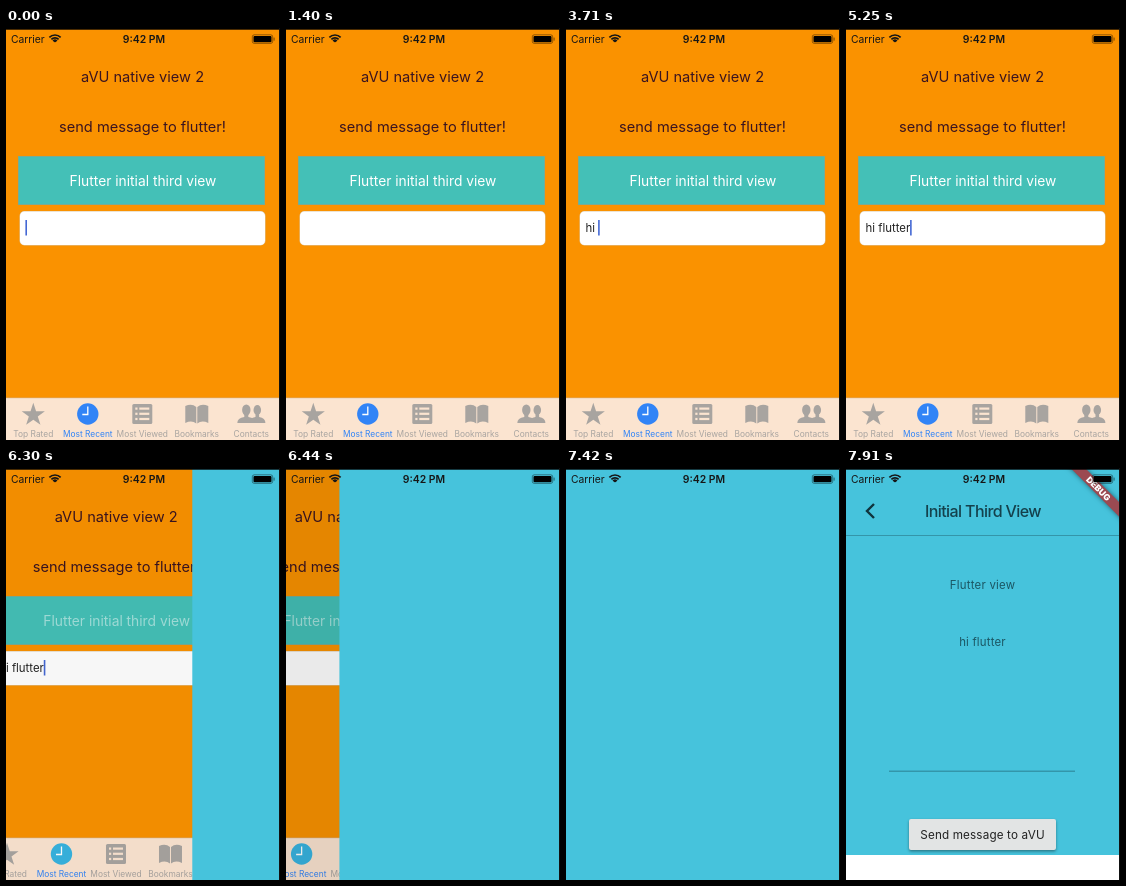
Animation of 274x412 px, one loop 8 s. Source, as an HTML page with a canvas:

```html
<!DOCTYPE html>
<html lang="en">
<head>
<meta charset="utf-8">
<title>Message demo</title>
<style>
html, body { margin: 0; width: 100%; height: 100%; overflow: hidden; background: #000; }
canvas { display: block; width: 274px; height: 412px; }
</style>
</head>
<body>
<canvas id="stage"></canvas>
<script>
const W = 274, H = 412, LOOP = 8000;
const ORANGE = '#fa9200', CYAN = '#46c3dc', GRAY = '#a8a4a0', BLUE = '#3284f6';
const MESSAGE = 'hi flutter';
const KEY_TIMES = [2870, 3080, 3360, 3920, 4060, 4200, 4340, 4480, 4760, 5250];
const PUSH = 6215, LOADED = 7460;

const canvas = document.getElementById('stage');
const ctx = canvas.getContext('2d');
const dpr = window.devicePixelRatio || 1;
canvas.width = W * dpr;
canvas.height = H * dpr;

const clamp = v => Math.max(0, Math.min(1, v));
const ramp = (t, a, b) => clamp((t - a) / (b - a));

function text(str, x, y, size, color, { weight = 400, align = 'center', track = 0 } = {}) {
  ctx.font = `${weight} ${size}px Inter, "Liberation Sans", sans-serif`;
  ctx.letterSpacing = track + 'px';
  ctx.textAlign = align;
  ctx.fillStyle = color;
  ctx.fillText(str, x, y);
}

function rect(x, y, w, h, color) {
  ctx.fillStyle = color;
  ctx.fillRect(x, y, w, h);
}

function round(x, y, w, h, r, color) {
  ctx.beginPath();
  ctx.roundRect(x, y, w, h, r);
  ctx.fillStyle = color;
  ctx.fill();
}

function disc(x, y, rx, ry, color) {
  ctx.beginPath();
  ctx.ellipse(x, y, rx, ry, 0, 0, Math.PI * 2);
  ctx.fillStyle = color;
  ctx.fill();
}

function line(points, color, width) {
  ctx.beginPath();
  points.forEach(([x, y]) => ctx.lineTo(x, y));
  ctx.strokeStyle = color;
  ctx.lineWidth = width;
  ctx.stroke();
}

// Tab icons, each centred on the origin
function star() {
  ctx.beginPath();
  for (let i = 0; i < 10; i++) {
    const a = -Math.PI / 2 + i * Math.PI / 5, r = i % 2 ? 4.7 : 12.2;
    ctx.lineTo(r * Math.cos(a), 1 + r * Math.sin(a));
  }
  ctx.fillStyle = GRAY;
  ctx.fill();
}

function clock(color) {
  disc(0, 0, 10.7, 10.7, color);
  line([[0, -7.5], [0, 0.5], [-5.5, 0.5]], '#fff', 1.3);
}

function list() {
  round(-10, -10, 20, 20, 1.5, GRAY);
  for (let y = -5.5; y < 7; y += 5.2) {
    rect(-7, y - 1, 2.2, 2.2, '#fbe4d0');
    rect(-3, y - 1, 10, 2.2, '#fbe4d0');
  }
}

function book() {
  for (const s of [-1, 1]) {
    ctx.beginPath();
    ctx.moveTo(s * 0.5, -7);
    ctx.quadraticCurveTo(s * 5, -11, s * 11.5, -8);
    ctx.lineTo(s * 11.5, 9);
    ctx.quadraticCurveTo(s * 5, 6, s * 0.5, 9.5);
    ctx.fillStyle = GRAY;
    ctx.fill();
  }
}

function person(x, y, k) {
  disc(x, y - 4, 4.2 * k, 5.6 * k, GRAY);
  rect(x - 2 * k, y - 1, 4 * k, 5, GRAY);
  ctx.beginPath();
  ctx.moveTo(x - 9 * k, 9);
  ctx.quadraticCurveTo(x - 9 * k, 4, x - 2 * k, 3);
  ctx.lineTo(x + 2 * k, 3);
  ctx.quadraticCurveTo(x + 9 * k, 4, x + 9 * k, 9);
  ctx.fill();
}

function people() {
  person(6, 0, 0.9);
  person(-5, 0, 1);
}

const TABS = [['Top Rated', star], ['Most Recent', clock], ['Most Viewed', list],
              ['Bookmarks', book], ['Contacts', people]];

function tabBar(discColor) {
  rect(0, 370, W, 42, '#fbe4d0');
  rect(0, 369.6, W, 0.6, '#d2ad85');
  TABS.forEach(([label, icon], i) => {
    const x = 27.3 + i * 54.5;
    ctx.save();
    ctx.translate(x, 386);
    icon(discColor);
    ctx.restore();
    text(label, x, 409, 8.4, i === 1 ? BLUE : GRAY);
  });
}

function caretAlpha(t) {
  if (t < 2870) {
    const p = t % 1000;
    return p < 500 ? 1 - ramp(p, 60, 350) : ramp(p, 580, 780);
  }
  return 1 - ramp(t, 5810, 5950) + ramp(t, 5960, 6090);
}

function nativeView(t) {
  const pressed = ramp(t, 6040, 6230);
  rect(0, 0, W, H, ORANGE);
  text('aVU native view 2', 136.5, 54, 14.6, '#3a1420');
  text('send message to flutter!', 136.5, 104, 14.6, '#3a1420');

  rect(12, 128, 247, 49, '#44c0b7');
  ctx.strokeStyle = '#78ab94';
  ctx.lineWidth = 1;
  ctx.strokeRect(12.5, 128.5, 246, 48);
  text('Flutter initial third view', 137, 157.5, 13.8, `rgba(255,255,255,${1 - 0.5 * pressed})`);

  round(13.5, 183, 246, 34.5, 5, '#d9c7a8');
  round(14, 183.5, 245, 33.5, 4.5, '#fff');
  const typed = MESSAGE.slice(0, KEY_TIMES.filter(k => t >= k).length);
  text(typed, 19.5, 204, 11.4, '#222', { align: 'left' });
  const x = 19.4 + ctx.measureText(typed).width;
  ctx.globalAlpha = caretAlpha(t);
  rect(x, 192, 1.6, 15.5, '#4468d4');
  ctx.globalAlpha = 1;

  tabBar(t > PUSH ? '#38b4e0' : BLUE);
}

function banner() {
  ctx.save();
  ctx.translate(273, 0);
  ctx.rotate(Math.PI / 4);
  ctx.shadowColor = 'rgba(0,0,0,.5)';
  ctx.shadowBlur = 5 * dpr;
  rect(-45, 24, 90, 10.3, '#9b4a52');
  ctx.shadowBlur = 0;
  text('DEBUG', 0, 32.3, 8.7, '#fff', { weight: 900 });
  ctx.restore();
}

function flutterView() {
  rect(0, 0, W, H, CYAN);
  rect(0, 387, W, 25, '#fff');
  line([[28, 36], [21, 43], [28, 50]], '#10343d', 2.4);
  text('Initial Third View', 137, 49, 16, '#14414c', { weight: 500, track: -0.6 });
  rect(0, 67, W, 1, '#3495a9');
  text('Flutter view', 136.5, 121, 11.4, '#1b5663', { track: 0.25 });
  text(MESSAGE, 136.5, 178, 11.4, '#1b5663', { track: 0.2 });
  rect(43, 302.7, 186, 0.9, '#26798a');

  ctx.save();
  ctx.shadowColor = 'rgba(0,0,0,.4)';
  ctx.shadowBlur = 3 * dpr;
  ctx.shadowOffsetY = 1.5 * dpr;
  round(63, 351, 147, 31, 2, '#e2e4e4');
  ctx.restore();
  text('Send message to aVU', 136.5, 371, 11.7, '#222', { track: 0.15 });
  banner();
}

function statusBar() {
  text('Carrier', 5, 14.6, 10.3, '#161616', { align: 'left' });
  for (let i = 1; i < 4; i++) {
    ctx.beginPath();
    ctx.arc(49, 15, i * 2.9 - 0.7, -Math.PI * 0.75, -Math.PI * 0.25);
    ctx.strokeStyle = '#161616';
    ctx.lineWidth = i === 1 ? 2.6 : 1.7;
    ctx.stroke();
  }
  text('9:42 PM', 138, 14.6, 10.4, '#161616', { weight: 600 });
  ctx.beginPath();
  ctx.roundRect(246.3, 6.8, 20.4, 8.6, 2);
  ctx.strokeStyle = 'rgba(0,0,0,.5)';
  ctx.lineWidth = 0.8;
  ctx.stroke();
  round(247.5, 8, 18, 6.2, 1, '#000');
  rect(267.6, 9.6, 1, 3, 'rgba(0,0,0,.5)');
}

function draw(t) {
  ctx.setTransform(dpr, 0, 0, dpr, 0, 0);
  // Critically damped push: the old view trails at 30% of the width
  const s = Math.max(0, t - PUSH) / 1000 * 13.4;
  const p = t > 6950 ? 1 : 1 - (1 + s) * Math.exp(-s);

  if (p < 1) {
    ctx.save();
    ctx.translate(-0.3 * W * p, 0);
    nativeView(t);
    ctx.restore();
    rect(0, 0, W, H, `rgba(0,0,0,${0.1 * p})`);
  }
  if (p > 0) rect(W * (1 - p), 0, W, H, CYAN);
  if (t > LOADED) {
    // Group fade of the loaded view over the plain backdrop
    flutterView();
    ctx.globalAlpha = 1 - ramp(t, LOADED, 7800);
    rect(0, 0, W, H, CYAN);
    ctx.globalAlpha = 1;
  }
  statusBar();
  rect(0, 0, W, 1.7, '#000');
  rect(273, 0, 1, H, '#111');
}

function tick(now) {
  draw(now % LOOP);
  requestAnimationFrame(tick);
}
draw(0);
requestAnimationFrame(tick);
</script>
</body>
</html>
```
